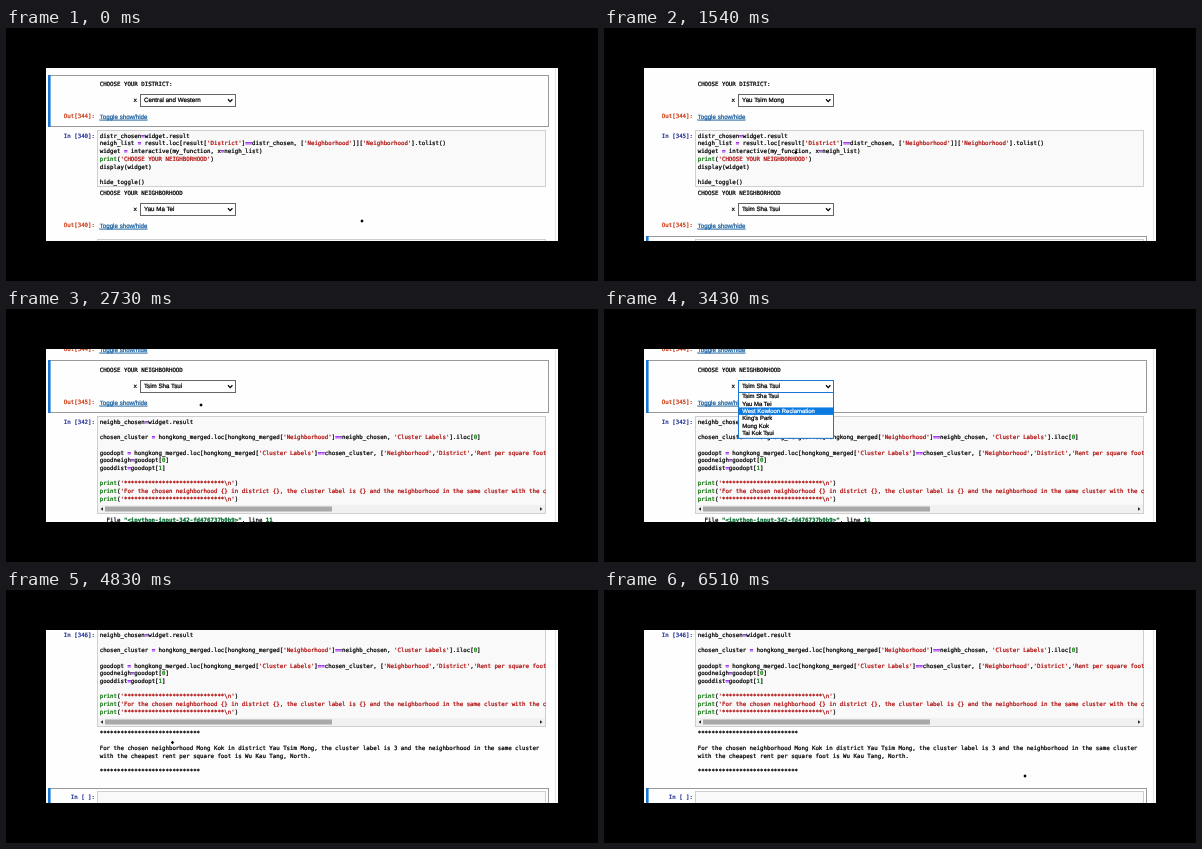
An HTML page that plays this animation: 592 px wide and 253 px high, repeating every 6.58 s.

```html
<!DOCTYPE html>
<html lang="en">
<head>
<meta charset="utf-8">
<title>Notebook walkthrough</title>
<style>
  html, body { margin: 0; width: 100%; height: 100%; overflow: hidden; background: #000; }
  svg { display: block; color: #000; }
  text, tspan { fill: currentColor; stroke: currentColor; stroke-width: .24px; }
  text { white-space: pre; text-rendering: geometricPrecision; }
  .mono { font: 5.76px "DejaVu Sans Mono", monospace; }
  .sans { font: 6.2px "Liberation Sans", Arial, sans-serif; }
  .item { font: 5.95px "Liberation Sans", Arial, sans-serif; }
</style>
</head>
<body>
<svg id="stage" width="592" height="253" viewBox="0 0 592 253">
  <defs>
    <clipPath id="page"><rect x="40" y="40" width="512" height="173"/></clipPath>
    <clipPath id="code"><rect x="91" y="0" width="449" height="253"/></clipPath>
  </defs>
  <rect width="592" height="253"/>
  <rect x="40" y="40" width="512" height="173" fill="#fefefe"/>
  <rect x="549" y="40" width="1" height="173" fill="#e4e4e4"/>
  <g id="view" clip-path="url(#page)"></g>
</svg>
<script>
const LOOP = 6580, STEP = 70, LINE = 7.68, ROW = 7.47, CHAR = 3.468, CODE_X = 93.7;
const BLUE = '#1976d2', GREEN = '#43a047';
const view = document.getElementById('view');
const stars = '*'.repeat(29);

const districts = ['Central and Western', 'Wan Chai', 'Eastern', 'Southern', 'Yau Tsim Mong',
  'Sham Shui Po', 'Kowloon City', 'Wong Tai Sin', 'Kwun Tong', 'Kwai Tsing', 'Tsuen Wan',
  'Tuen Mun', 'Yuen Long', 'North', 'Tai Po', 'Sha Tin', 'Sai Kung', 'Islands'];
const areas = ['Tsim Sha Tsui', 'Yau Ma Tei', 'West Kowloon Reclamation', "King's Park",
  'Mong Kok', 'Tai Kok Tsui'];

const pickCode = [
  'distr_chosen=widget.result',
  "neigh_list = result.loc[result['District']==distr_chosen, ['Neighborhood']]['Neighborhood'].tolist()",
  'widget = interactive(my_function, x=neigh_list)',
  "print('CHOOSE YOUR NEIGHBORHOOD')",
  'display(widget)',
  '',
  'hide_toggle()'];
const answerCode = [
  'neighb_chosen=widget.result',
  '',
  "chosen_cluster = hongkong_merged.loc[hongkong_merged['Neighborhood']==neighb_chosen, 'Cluster Labels'].iloc[0]",
  '',
  "goodopt = hongkong_merged.loc[hongkong_merged['Cluster Labels']==chosen_cluster, ['Neighborhood','District','Rent per square foot']]",
  'goodneigh=goodopt[0]',
  'gooddist=goodopt[1]',
  '',
  `print('${stars}\\n')`,
  "print('For the chosen neighborhood {} in district {}, the cluster label is {} and the neighborhood in the same cluster with the cheapest",
  `print('${stars}\\n')`];

// Moments of each action, in ms
const at = { openDistrict: 770, pickDistrict: 1260, editPick: 1330, runPick: 1540, hide: 2380,
  openArea: 2940, pickArea: 3640, editAnswer: 4060, runAnswer: 4620 };

const pointerPath = [[0, 356, 193], [140, 356, 193], [700, 221, 73], [980, 221, 73],
  [1190, 170, 112], [1260, 170, 112], [1400, 190, 125], [2100, 208, 119], [2310, 118, 150],
  [2450, 118, 150], [2870, 222, 77], [3080, 222, 77], [3430, 175, 103], [3570, 165, 117],
  [3640, 165, 117], [4060, 183, 145], [4620, 183, 145], [5040, 150, 160],
  [5530, 257, 171], [6510, 421, 186]];
const scrollPath = [[0, 0], [1610, 0], [1750, 48], [3710, 48], [3920, 86], [4620, 86], [4690, 116]];

function follow(path, t) {
  const next = path.findIndex(p => p[0] > t);
  if (next < 0) return path[path.length - 1].slice(1);
  const a = path[next - 1], b = path[next];
  const u = (t - a[0]) / (b[0] - a[0]), ease = u * u * (3 - 2 * u);
  return a.slice(1).map((v, i) => v + (b[i + 1] - v) * ease);
}

const escape = s => s.replace(/&/g, '&amp;').replace(/</g, '&lt;');
const span = (s, color, bold) =>
  `<tspan color="${color}"${bold ? ' font-weight="bold"' : ''}>${escape(s)}</tspan>`;
const rect = (x, y, w, h, fill, stroke = 'none') =>
  `<rect x="${x}" y="${y}" width="${w}" height="${h}" fill="${fill}" stroke="${stroke}"/>`;
const raw = (x, mid, body, kind = 'mono', extra = '') =>
  `<text class="${kind}" x="${x}" y="${mid + 1.8}" ${extra}>${body}</text>`;
const label = (x, mid, s, kind, extra) => raw(x, mid, escape(s), kind, extra);

function highlight(line) {
  return line.replace(/('[^']*'?)|\bprint\b|==?|\b\d\b|[^'=\dp]+|./g, (s, quoted) => {
    if (quoted) return span(s, '#b00c0c');
    if (s === 'print') return span(s, '#007000');
    if (s[0] === '=') return span(s, '#9010f0', true);
    if (/^\d$/.test(s)) return span(s, '#070');
    return escape(s);
  });
}

const prompt = (mid, s, color) => label(89, mid, s, 'mono', `text-anchor="end" color="${color}"`);
const inPrompt = (y, n) => prompt(y + 9, `In [${n}]:`, '#1c2c94');

function codeBox(y, height, lines) {
  return rect(91.5, y + 3.5, 448, height, '#f9f9f9', '#cfcfcf') +
    `<g clip-path="url(#code)">` +
    lines.map((s, i) => raw(CODE_X, y + 9 + i * LINE, highlight(s))).join('') + '</g>';
}

function selection(y, height, editing) {
  return rect(43.5, y + .5, 499, height - 1, 'none', editing ? GREEN : '#999') +
    rect(42, y, 2.6, height, editing ? GREEN : BLUE);
}

function chooser(y, title, value, n, open) {
  return label(CODE_X, y + 9, title) + label(127.5, y + 25.5, 'x') +
    rect(134.5, y + 19.5, 95, 12, '#fff', open ? BLUE : '#666') +
    label(138, y + 25.5, value, 'sans') +
    `<path d="M222 ${y + 24.3}l2.2 2.3 2.2-2.3" fill="none" stroke="#000" stroke-width="1.3"/>` +
    prompt(y + 41.5, `Out[${n}]:`, '#cc3208') +
    label(CODE_X, y + 42, 'Toggle show/hide', 'sans', 'color="#175f9e" text-decoration="underline"');
}

function dropdown(top, items, pointerY) {
  const active = Math.max(0, Math.floor((pointerY - top) / ROW));
  return rect(134.5, top, 95, items.length * ROW + 1, '#fff', BLUE) +
    items.map((s, i) => (i === active ? rect(135, top + i * ROW, 94, ROW, '#0a7ae0') : '') +
      label(138.3, top + (i + .5) * ROW, s, 'item', i === active ? 'color="#fff"' : '')).join('');
}

function scrollbar(y) {
  const mid = y + 96;
  return rect(92, y + 92, 447, 8, '#f1f1f1') + rect(99, mid - 2.5, 227, 5, '#a9a9a9') +
    `<path d="M97 ${mid - 1.8}v3.6l-2.4-1.8zM534 ${mid - 1.8}v3.6l2.4-1.8z" fill="#222"/>`;
}

function errorOutput(y) {
  const file = '"<ipython-input-342-fd476737b0b9>"';
  return raw(CODE_X, y + 107, '  File ' + span(file, '#00662c', true) + ', line ' + span('11', '#00662c', true)) +
    raw(CODE_X, y + 115, '    ' + span('print', '#8a4d0c', true) + `('${stars}\\n'` + span('a)', '#8a4d0c')) +
    label(CODE_X + 43 * CHAR, y + 122.5, '^', 'mono', 'color="#922"') +
    raw(CODE_X, y + 130, span('SyntaxError', '#b01818') + ': invalid syntax');
}

function answerOutput(y) {
  return [[107, stars],
    [122.3, 'For the chosen neighborhood Mong Kok in district Yau Tsim Mong, the cluster label is 3 and the neighborhood in the same cluster'],
    [130, 'with the cheapest rent per square foot is Wu Kau Tang, North.'],
    [145, stars]].map(([dy, s]) => label(CODE_X, y + dy, s)).join('');
}

function render(t) {
  const between = (a, b) => t >= at[a] && t < at[b];
  const [px, py] = follow(pointerPath, t);
  const hidden = t >= at.hide, ran = t >= at.runPick, answered = t >= at.runAnswer;
  const districtOpen = between('openDistrict', 'pickDistrict');
  const areaOpen = between('openArea', 'pickArea');
  const a = 47 - Math.round(follow(scrollPath, t)[0]);
  const b = a + 52, bOut = b + (hidden ? 1 : 57), c = bOut + 52;
  const d = c + (answered ? 162 : 144);
  let out = '';

  if (t < at.editPick) out += selection(a, 52);
  else if (t < at.runPick) out += selection(b, c - b, true);
  else if (t < at.hide) out += selection(c, 144);
  else if (t < at.editAnswer) out += selection(b, c - b);
  else if (t < at.runAnswer) out += selection(c, 150, true);
  else out += selection(d, 30);

  const district = districts[t < at.pickDistrict ? 0 : 4];
  const area = !ran ? 'Yau Ma Tei' : areas[t < at.pickArea ? 0 : 4];
  const pickRun = ran ? 345 : 340;

  out += chooser(a, 'CHOOSE YOUR DISTRICT:', district, 344, districtOpen);
  if (!hidden) out += inPrompt(b, pickRun) + codeBox(b, 56, pickCode);
  out += chooser(bOut, 'CHOOSE YOUR NEIGHBORHOOD', area, pickRun, areaOpen);
  out += inPrompt(c, answered ? 346 : 342) + codeBox(c, 97, answerCode) + scrollbar(c);
  out += answered ? answerOutput(c) : errorOutput(c);
  if (answered) out += inPrompt(d, ' ') + codeBox(d, 12, []);
  if (between('editAnswer', 'runAnswer'))
    out += rect(CODE_X + 25 * CHAR, c + 36, .8, 7.5, '#000');

  if (districtOpen) out += dropdown(a + 31.5, districts, py);
  if (areaOpen) out += dropdown(bOut + 31.5, areas, py);

  const overList = districtOpen && py > a + 32 || areaOpen && py > bOut + 32;
  if (!overList)
    out += `<path d="M${px} ${py - 1.8}l1.7 1.8-1.7 1.8-1.7-1.8z" fill="#000"/>`;
  view.innerHTML = out;
}

let shown = -1;
function tick(now) {
  const t = Math.floor(now % LOOP / STEP) * STEP;
  if (t !== shown) render(shown = t);
  requestAnimationFrame(tick);
}
render(0);
requestAnimationFrame(tick);
</script>
</body>
</html>
```
